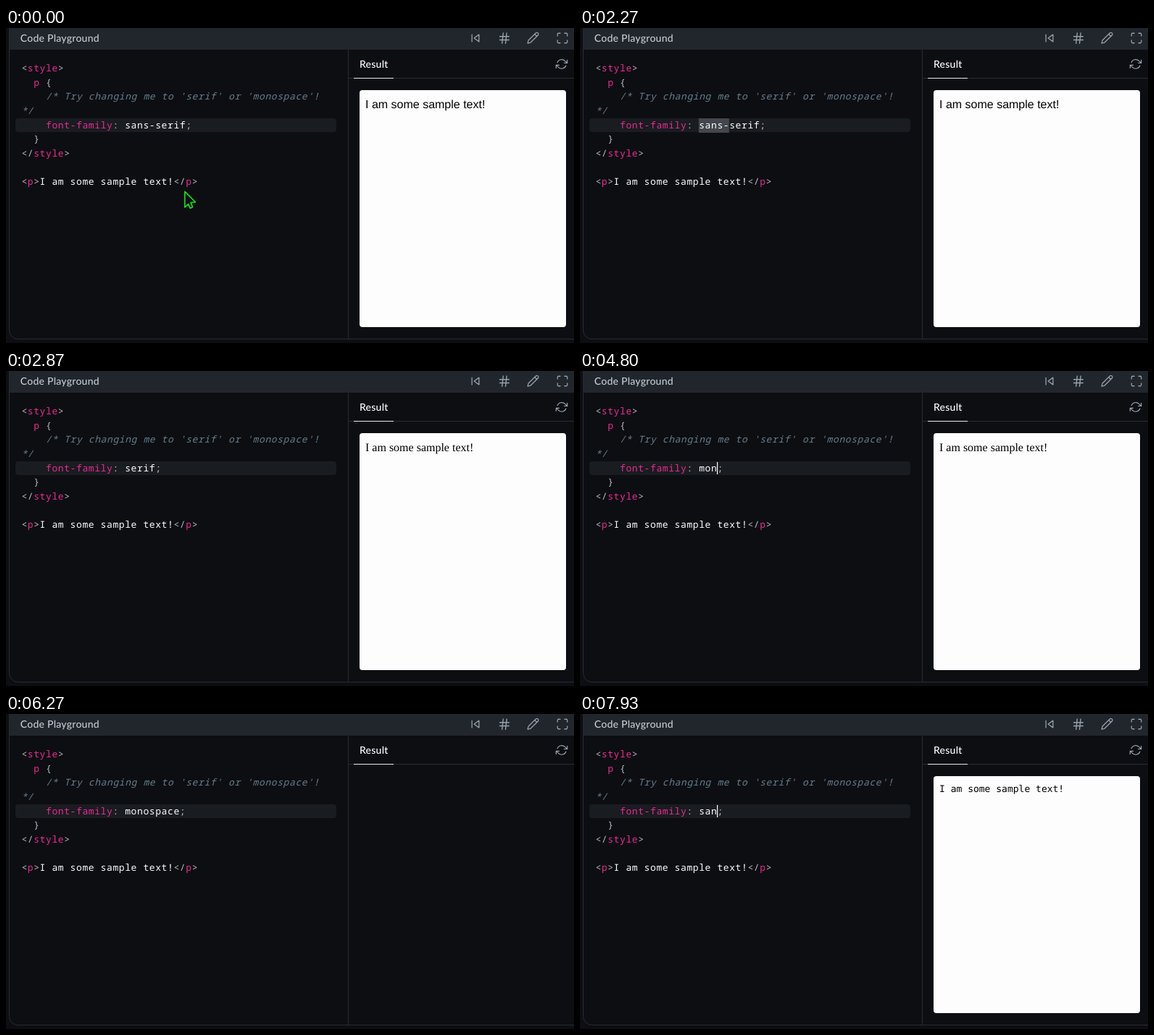
Animation of 784 by 436 pixels, one loop 8000 ms. Source, as an HTML page:

```html
<!DOCTYPE html>
<html lang="en">
<head>
<meta charset="utf-8">
<title>Code Playground</title>
<style>
  html, body { margin: 0; width: 100%; height: 100%; overflow: hidden; background: #0d0e12; }
  svg, pre { position: absolute; left: 0; top: 0; text-rendering: geometricPrecision; }
  pre {
    left: 21.4px; top: 46.2px; margin: 0; color: #fff;
    font: 500 13px/19.6px "Noto Sans Mono", monospace; letter-spacing: .6px;
  }
  pre b { font-weight: 500; color: #ec2a94; }
  pre i { font-weight: 400; color: #647f8e; }
  pre s { text-decoration: none; color: #b6bbc2; }
  .ui { font: 500 14px Lato, sans-serif; letter-spacing: .25px; }
  .icons { fill: none; stroke: #98a2ad; stroke-width: 1.7; stroke-linecap: round; stroke-linejoin: round; }
  .sans-serif { font: 16px "Liberation Sans", sans-serif; }
  .serif { font: 16px "Liberation Serif", serif; }
  .monospace { font: 13px "DejaVu Sans Mono", monospace; }
</style>
</head>
<body>
<svg width="784" height="436" viewBox="0 0 784 436">
  <rect x="5" width="779" height="30" fill="#21262c"/>
  <g fill="none" stroke="#282c32">
    <path d="M4.5 0V418.5a12 12 0 0 0 12 12H784M472.5 30V430M473 69.5H784"/>
    <path d="M480 69.5H535" stroke="#e8e9eb"/>
  </g>
  <text class="ui" x="19.8" y="19" fill="#c3cbd5">Code Playground</text>
  <text class="ui" x="488" y="54.8" fill="#fff">Result</text>

  <g class="icons">
    <path transform="translate(639 5) scale(.75)" d="M5.5 5.5v13M18.5 5.5L9.5 12l9 6.5z"/>
    <path transform="translate(678.3 4.5) scale(.8)" d="M4 9h16M4 15h16M10 3L8 21M16 3l-2 18"/>
    <path transform="translate(718.5 4.7) scale(.75)" d="M17 3a2.83 2.83 0 1 1 4 4L7.5 20.5 2 22l1.5-5.5zM15 5l4 4"/>
    <path transform="translate(759 5) scale(.75)" d="M8 3H5a2 2 0 0 0-2 2v3m18 0V5a2 2 0 0 0-2-2h-3m0 18h3a2 2 0 0 0 2-2v-3M3 16v3a2 2 0 0 0 2 2h3"/>
    <path transform="translate(758.6 41.5) scale(.7)" d="M23 4v6h-6M1 20v-6h6M3.51 9a9 9 0 0 1 14.85-3.36L23 10M1 14l4.64 4.36A9 9 0 0 0 20.49 15"/>
  </g>

  <rect x="13" y="125" width="443" height="19" rx="4" fill="#191c20"/>
  <rect id="selection" y="125" height="20" fill="#42474e"/>

  <g id="page">
    <rect x="488" y="86" width="285" height="328" rx="4" fill="#fdfdfd"/>
    <text id="sample" x="496">I am some sample text!</text>
  </g>
</svg>

<pre><s>&lt;</s><b>style</b><s>&gt;</s>
  <b>p</b> <s>{</s>
    <i>/* Try changing me to 'serif' or 'monospace'!</i>
<i>*/</i>
    <b>font-family</b><s>:</s> <span id="value"></span><s>;</s>
  <s>}</s>
<s>&lt;/</s><b>style</b><s>&gt;</s>

<s>&lt;</s><b>p</b><s>&gt;</s>I am some sample text!<s>&lt;/</s><b>p</b><s>&gt;</s></pre>

<svg width="784" height="436" viewBox="0 0 784 436">
  <rect id="caret" y="126" width="1.2" height="17" fill="#fff"/>
  <path id="pointer" d="M246.8 226.3V248.2l4.7-4.4 2.8 5.6 3.3-1.6-2.6-6.2 6.4-.6z"
        fill="#0d0e12" stroke="#12dd18" stroke-width="1.7" stroke-linejoin="round"/>
</svg>

<script>
const LOOP = 8000, BLINK = 500, CHAR = 8.4, VALUE_X = 163.8;
const $ = id => document.getElementById(id);
const show = (el, on) => el.style.visibility = on ? 'visible' : 'hidden';

// Each edit: [time, value, caret column, selected characters]
const edits = [
  [-500, 'sans-serif', 5, 0],
  [1895, 'sans-serif', 0, 5],
  [2325, 'serif', 0, 0],
  [3665, 'serif', 0, 5],
  ...type('mono', 4465, 155),
  ...type('monospace', 5100, 167, 4),
  [7125, 'monospace', 0, 9],
  ...type('san', 7580, 160)
];
// Each reload: [time the preview goes blank, time it returns, font]
const reloads = [
  [-1, 0, 'sans-serif'],
  [2735, 2860, 'serif'],
  [6262, 6395, 'monospace']
];

function type(word, start, step, from = 0) {
  return [...word].slice(from).map((_, i) => {
    const length = from + i + 1;
    return [start + i * step, word.slice(0, length), length, 0];
  });
}

const latest = (list, t) => list.filter(entry => entry[0] <= t).pop();

function draw(t) {
  const [since, value, column, selected] = latest(edits, t);
  $('value').textContent = value;
  $('selection').setAttribute('x', VALUE_X + column * CHAR);
  $('selection').setAttribute('width', selected * CHAR);
  $('caret').setAttribute('x', VALUE_X + column * CHAR);
  show($('caret'), !selected && t > 500 && Math.floor((t - since) / BLINK) % 2 === 0);
  show($('pointer'), t < 400);

  const [, ready, font] = latest(reloads, t);
  show($('page'), t >= ready);
  $('sample').setAttribute('class', font);
  $('sample').setAttribute('y', font === 'monospace' ? 108 : 111);
}

function frame(now) {
  draw(now % LOOP);
  requestAnimationFrame(frame);
}
draw(0);
requestAnimationFrame(frame);
</script>
</body>
</html>
```
